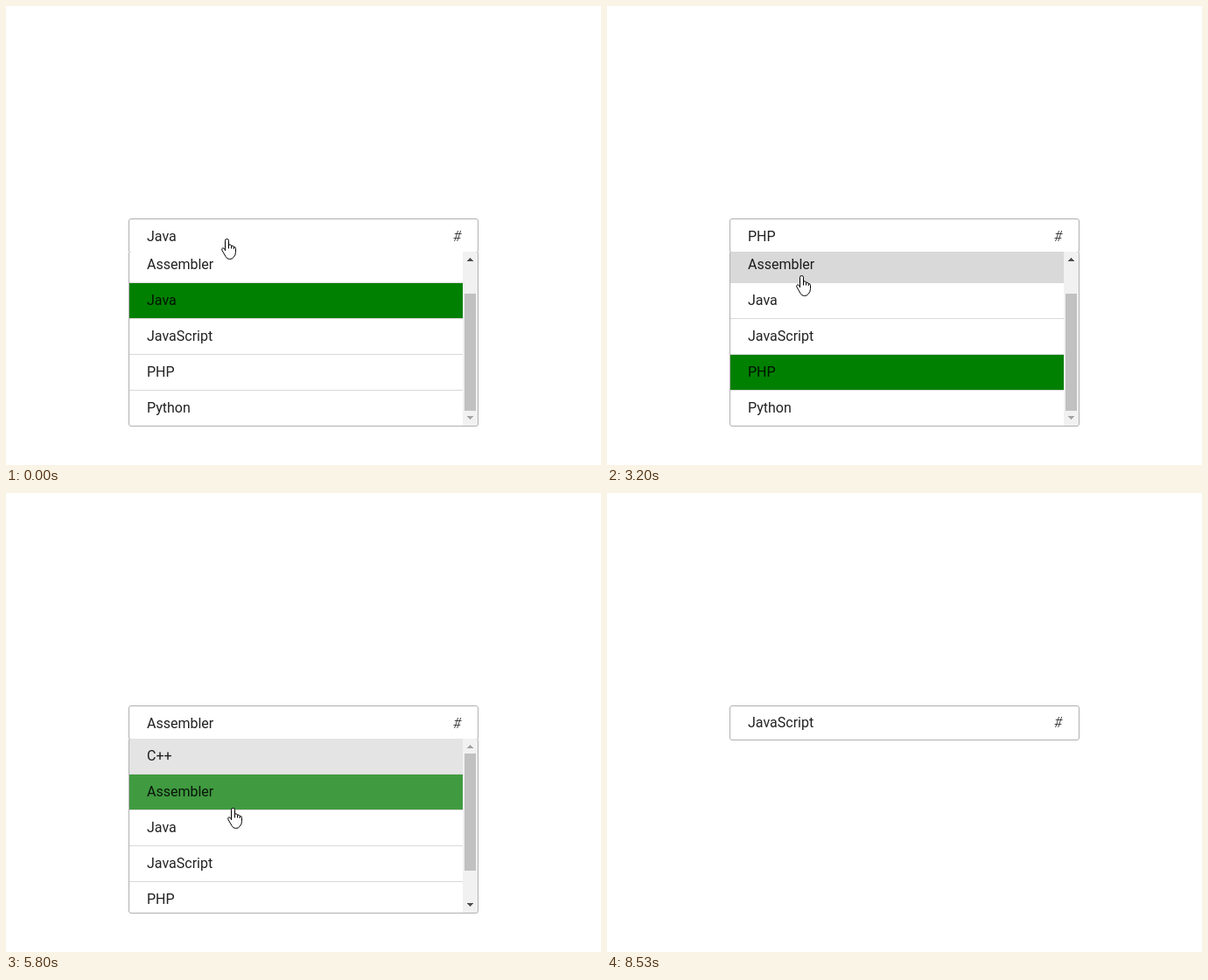
Animation of 680x525 px, one loop 9.14 s. Source, as an HTML page with a canvas:

```html
<!DOCTYPE html>
<html lang="en">
<head>
<meta charset="utf-8">
<title>Select box</title>
<style>
  html, body { margin: 0; overflow: hidden; background: #fff; }
  canvas { display: block; }
</style>
</head>
<body>
<canvas id="stage" width="680" height="525"></canvas>
<script>
const ctx = document.getElementById('stage').getContext('2d', { alpha: false });
const LOOP = 9140, STEP = 200 / 3, FADE = 300, MAX_SCROLL = 46;
const ROWS = ['C++', 'Assembler', 'Java', 'JavaScript', 'PHP', 'Python'];
const LIST = { top: 281, left: 141, width: 381, height: 199, pitch: 41 };
const WHITE = [255, 255, 255], GREEN = [0, 128, 0], GREY = [217, 217, 217];

// Each visit opens the list, then closes it by picking a row
const VISITS = [
  { open: 0, close: 1990, row: 'PHP' },
  { open: 2660, close: 3660, row: 'Assembler' },
  { open: 4060, close: 7190, row: 'JavaScript' }
];

// Eased pointer moves: start, duration, end x, end y
const START = [252, 266];
const MOVES = [
  [400, 930, 258, 420],
  [2000, 530, 240, 269],
  [2760, 370, 222, 308],
  [3670, 400, 257, 268],
  [4070, 490, 257, 385],
  [5000, 470, 258, 298],
  [5648, 309, 260, 425],
  [6200, 260, 238, 452],
  [6460, 320, 224, 387],
  [7200, 400, 77, 352],
  [8140, 390, 91, 530]
];

const hand = new Path2D('M4.5 14V2.3Q4.5 .5 6.5 .5Q8.5 .5 8.5 2.3V7Q11 6.2 11.5 8.3' +
  'Q13.8 7.6 14.2 9.6Q16.5 9.2 16.5 11.5V15.5Q16.5 19 14 21.5Q12.8 23.5 9.5 23.5' +
  'Q6.4 23.5 5 20.5L.9 13.4Q.1 11.3 1.8 10.8Q3 10.6 4.5 13');
const knuckles = new Path2D('M8.5 7V11.5M11.5 8.3V11.5M14.2 9.6V12');
const arrow = new Path2D('M.5 .5V16.5L4.2 13L6.7 18.6L9.2 17.5L6.8 12.1H11.8Z');

function smooth(p) {
  p = Math.min(1, Math.max(0, p));
  return p * p * (3 - 2 * p);
}

// CSS "ease", its curve parameter found by bisection
function ease(x) {
  if (x >= 1) return 1;
  let lo = 0, hi = 1, s;
  for (let i = 0; i < 16; i++) {
    s = (lo + hi) / 2;
    if (.75 * s * (1 - s) + s ** 3 < x) lo = s; else hi = s;
  }
  return .3 * s * (1 - s) ** 2 + 3 * s * s * (1 - s) + s ** 3;
}

function pointerAt(t) {
  let [x, y] = START;
  for (const [start, duration, toX, toY] of MOVES) {
    const p = smooth((t - start) / duration);
    x += (toX - x) * p;
    y += (toY - y) * p;
  }
  return [x, y];
}

const scrollAt = t => MAX_SCROLL * (1 - smooth((t - 4700) / 130) + smooth((t - 6000) / 130));
const isOpen = t => VISITS.some(v => t >= v.open && t < v.close);

function selectedAt(t) {
  return VISITS.reduce((row, v) => t >= v.close ? v.row : row, 'Java');
}

function hoveredRow(t) {
  const [x, y] = pointerAt(t), dx = x - LIST.left, dy = y - LIST.top;
  const inside = dx >= 0 && dx < LIST.width && dy >= 0 && dy < LIST.height;
  return isOpen(t) && inside ? Math.floor((dy + scrollAt(t)) / LIST.pitch) : -1;
}

const fadeValue = (f, t) => f.from + (f.to - f.from) * ease((t - f.start) / FADE);

// Replays the hover transitions up to the given time
function hoverLevels(time) {
  const fades = ROWS.map(() => ({ from: 0, to: 0, start: -FADE }));
  for (let t = 0; t <= time; t += 10) {
    const row = hoveredRow(t), open = isOpen(t);
    fades.forEach((f, i) => {
      const to = row === i ? 1 : 0;
      if (!open) Object.assign(f, { from: 0, to: 0 });
      else if (to !== f.to) Object.assign(f, { from: fadeValue(f, t), to, start: t });
    });
  }
  return fades.map(f => fadeValue(f, time));
}

function rect(color, x, y, w, h) {
  ctx.fillStyle = color;
  ctx.fillRect(x, y, w, h);
}

function label(text, x, baseline, style = '') {
  ctx.font = style + ' 16px Roboto, sans-serif';
  ctx.fillStyle = 'rgba(0, 0, 0, .87)';
  ctx.fillText(text, x, baseline);
}

function clipped(x, y, w, h, draw) {
  ctx.save();
  ctx.beginPath();
  ctx.rect(x, y, w, h);
  ctx.clip();
  draw();
  ctx.restore();
}

function outline(y, h) {
  ctx.beginPath();
  ctx.roundRect(140.5, y, 399, h, 2.5);
  ctx.strokeStyle = '#b0b0b0';
  ctx.lineWidth = 1;
  ctx.stroke();
}

function drawScrollbar(scroll) {
  const arrowColor = active => active ? '#505050' : '#a3a3a3';
  rect('#f1f1f1', 522, LIST.top, 17, LIST.height);
  rect('#c1c1c1', 524, Math.round(298 + scroll * 31 / MAX_SCROLL), 13, 134);
  for (let i = 0; i < 4; i++) {
    rect(arrowColor(scroll > 0), 530 - i, 288 + i, 1 + 2 * i, 1);
    rect(arrowColor(scroll < MAX_SCROLL), 530 - i, 472 - i, 1 + 2 * i, 1);
  }
}

function drawList(t) {
  const scroll = Math.round(scrollAt(t));
  const levels = hoverLevels(t), selected = selectedAt(t);
  clipped(LIST.left, LIST.top, LIST.width, LIST.height, () => ROWS.forEach((name, i) => {
    const y = LIST.top + i * LIST.pitch - scroll;
    const base = name === selected ? GREEN : WHITE;
    const color = base.map((v, n) => Math.round(v + (GREY[n] - v) * levels[i]));
    rect(`rgb(${color})`, LIST.left, y, LIST.width, 40);
    rect('#d9d9d9', LIST.left, y + 40, LIST.width, 1);
    label(name, 161, y + 25);
  }));
  drawScrollbar(scroll);
  clipped(140, LIST.top, 400, 200, () => outline(280.5, 200));
}

function drawPointer(t, open) {
  const [x, y] = pointerAt(t).map(Math.round);
  const overBox = x >= 140 && x < 540 && y >= 243 && y < (open ? 481 : 283);
  const shape = overBox ? hand : arrow;
  ctx.save();
  ctx.translate(overBox ? x - 6 : x, y);
  ctx.fillStyle = '#fff';
  ctx.strokeStyle = '#000';
  ctx.lineWidth = 1;
  ctx.fill(shape);
  ctx.stroke(shape);
  if (overBox) ctx.stroke(knuckles);
  ctx.restore();
}

function draw(t) {
  const open = isOpen(t), baseline = open ? 269 : 268;
  rect('#fff', 0, 0, 680, 525);
  clipped(140, 243, 400, open ? 38 : 40, () => outline(243.5, 39));
  label(selectedAt(t), 161, baseline);
  label('#', 511, baseline, 'italic 300');
  if (open) drawList(t);
  drawPointer(t, open);
}

// The picture advances 15 times per second
function tick() {
  const t = performance.now() % LOOP;
  draw(Math.floor(t / STEP + .051) * STEP);
  requestAnimationFrame(tick);
}
tick();
</script>
</body>
</html>
```
